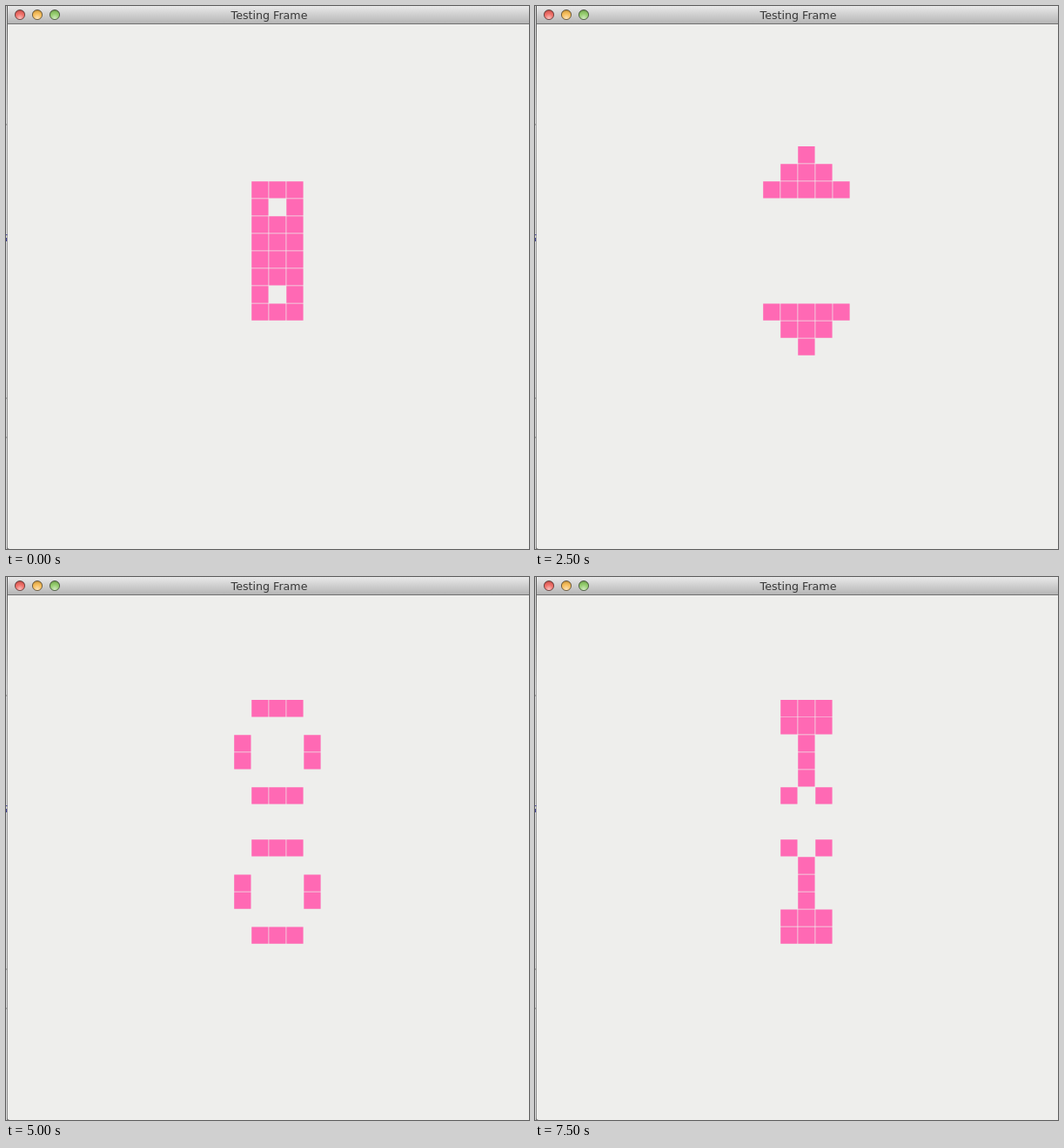
Recreate the animation shown at these times as an HTML page. Size 601 by 623 pixels, loop 8 s.

```html
<!DOCTYPE html>
<html lang="en">
<head>
<meta charset="utf-8">
<title>Testing Frame</title>
<style>
  html, body { margin: 0; width: 100%; height: 100%; overflow: hidden; background: #eeeeec; }
  svg { display: block; }
  text { font: 12.65px "DejaVu Sans", sans-serif; fill: #383838; text-anchor: middle; }
</style>
</head>
<body>
<svg width="601" height="623" viewBox="0 0 601 623">
  <defs>
    <linearGradient id="bar" x2="0" y2="1">
      <stop offset="0" stop-color="#e9e9e9"/>
      <stop offset="1" stop-color="#b5b5b5"/>
    </linearGradient>
    <linearGradient id="edge" x2="0" y2="1">
      <stop offset="0" stop-color="#555"/>
      <stop offset=".2" stop-color="#a8a8a8"/>
      <stop offset="1" stop-color="#8c8c8c"/>
    </linearGradient>
    <radialGradient id="shine" cx=".5" cy=".85" r=".8">
      <stop offset="0" stop-color="#fff" stop-opacity=".6"/>
      <stop offset=".6" stop-color="#fff" stop-opacity=".1"/>
      <stop offset="1" stop-color="#000" stop-opacity=".25"/>
    </radialGradient>
  </defs>
  <rect width="601" height="623" fill="#eeeeec"/>
  <rect width="1" height="623" fill="#dcdcdc"/>
  <rect x="1" width="1" height="623" fill="url(#edge)"/>
  <path d="M0 136h1M0 450h1M0 495h1" stroke="#777"/>
  <path d="M0 262.5h1.5M.5 266v4" stroke="#44449a"/>
  <path d="M1 620q.5 2.5 3 3H1z" fill="#777"/>
  <path d="M2 20V3q0-3 3-3H601V20z" fill="url(#bar)"/>
  <rect x="2" y="20" width="599" height="1" fill="#707070"/>
  <g id="lights"></g>
  <text x="302.5" y="15">Testing Frame</text>
  <path id="cells" fill="#ff69b4"/>
</svg>
<script>
const COLS = 30, ROWS = 30, PITCH = 20.03, SIZE = 19.3;
const STARTS = [0, 500, 1000, 2000, 2500, 3500, 4000, 5000, 5500, 6000, 7000, 7500];
const LOOP = 8000;

document.getElementById('lights').innerHTML = ['#ee5b53', '#f5b545', '#86c65a'].map((color, i) => {
  const circle = `<circle cx="${16 + 20 * i}" cy="10"`;
  return `${circle} r="5.6" fill="${color}"/>${circle} r="5.6" fill="url(#shine)" stroke="#000" stroke-opacity=".5"/>`;
}).join('');

const makeGrid = rule => Array.from({ length: ROWS }, (_, y) =>
  Array.from({ length: COLS }, (_, x) => rule(x, y)));

// A 3 x 8 block with two holes: one phase of the pentadecathlon
const seed = makeGrid((x, y) =>
  x >= 14 && x <= 16 && y >= 9 && y <= 16 && !(x === 15 && (y === 10 || y === 15)));

function evolve(grid) {
  return makeGrid((x, y) => {
    let n = 0;
    for (let dy = -1; dy <= 1; dy++)
      for (let dx = -1; dx <= 1; dx++)
        if ((dx || dy) && grid[y + dy]?.[x + dx]) n++;
    return n === 3 || (n === 2 && grid[y][x]);
  });
}

function toPath(grid) {
  let d = '';
  grid.forEach((row, y) => row.forEach((alive, x) => {
    if (alive) d += `M${1.8 + x * PITCH} ${20.9 + y * PITCH}h${SIZE}v${SIZE}h${-SIZE}z`;
  }));
  return d;
}

let grid = seed;
const paths = STARTS.map(() => {
  const d = toPath(grid);
  grid = evolve(grid);
  return d;
});

const cells = document.getElementById('cells');
const origin = performance.now();
let shown = -1;

function draw() {
  const t = Math.max(0, performance.now() - origin) % LOOP;
  const step = STARTS.filter(s => s <= t).length - 1;
  if (step !== shown) cells.setAttribute('d', paths[shown = step]);
  requestAnimationFrame(draw);
}
draw();
</script>
</body>
</html>
```
